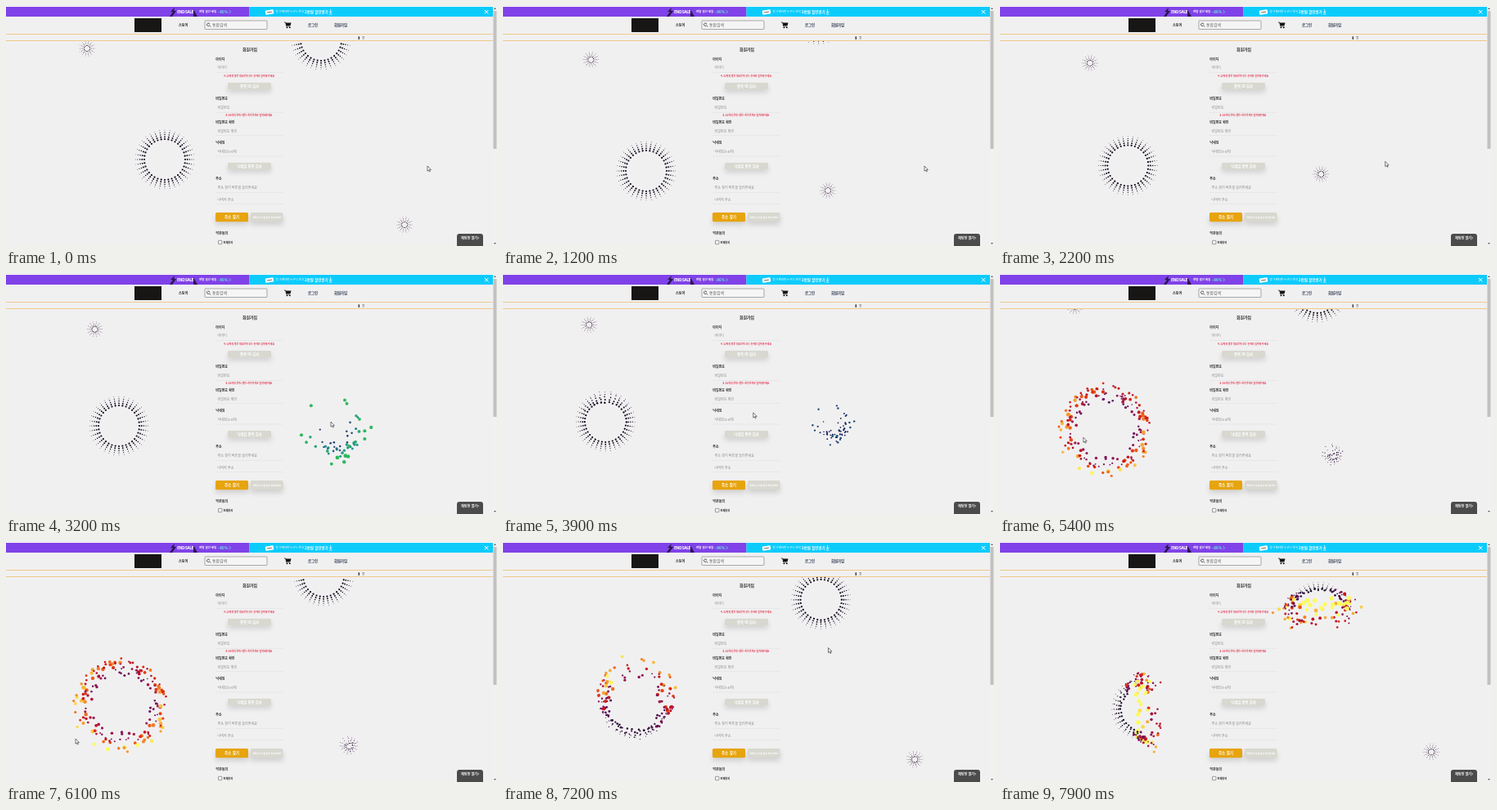
These frames come from a looping animation (600x294 px, 8000 ms). An HTML page with a canvas:

```html
<!DOCTYPE html>
<html lang="ko">
<head>
<meta charset="utf-8">
<style>
html, body { margin: 0; width: 600px; height: 294px; overflow: hidden; background: #f1f0f1; }
canvas, svg { position: absolute; left: 0; top: 0; width: 600px; height: 294px; }
text { font-family: "Noto Sans CJK KR", "Noto Sans CJK", "Noto Sans CJK JP", sans-serif; white-space: pre; }
.tight { letter-spacing: -.6px; }
</style>
</head>
<body>
<canvas width="600" height="294"></canvas>
<svg viewBox="0 0 600 294">
  <defs>
    <filter id="soft" x="-30%" y="-80%" width="160%" height="300%"><feGaussianBlur stdDeviation="3"/></filter>
  </defs>
  <g id="page"></g>
  <path id="cursor" d="M0 0V6.2L1.5 4.9L2.5 7L3.4 6.6L2.5 4.6H4.4Z" fill="#fff" stroke="#222" stroke-width=".6"/>
</svg>
<script>
const LOOP = 8, STEP = .1, HEADER = 43;

// ---- static page ----
const rect = (x, y, w, h, fill, more = '') =>
  `<rect x="${x}" y="${y}" width="${w}" height="${h}" fill="${fill}" ${more}/>`;
const line = (d, stroke, width = .8) => `<path d="${d}" fill="none" stroke="${stroke}" stroke-width="${width}"/>`;
const shape = (d, fill) => `<path d="${d}" fill="${fill}"/>`;
const text = (x, y, size, str, fill = '#222', weight = 700, more = '') =>
  `<text x="${x}" y="${y + size * .36}" font-size="${size}" fill="${fill}" font-weight="${weight}" ${more}>${str}</text>`;
const centred = (x, y, size, str, fill, weight) => text(x, y, size, str, fill, weight, 'text-anchor="middle"');
const label = (y, str) => text(256.3, y, 4, str);
const field = (y, str) => text(258.5, y, 4.1, str, '#868686', 400) + rect(256, y + 5, 83, .5, '#dcdcdc');
const hint = (y, str) => centred(297, y, 2.9, str, '#e0354f');
const button = (x, y, w, h, fill, str, size = 4.4) =>
  rect(x, y + 4, w, h, '#000', 'opacity=".13" filter="url(#soft)"') +
  rect(x, y, w, h, fill, 'rx="1.5"') + centred(x + w / 2, y + h / 2, size, str, '#fff');

const banner =
  rect(0, 0, 600, 1, '#fafafa') + rect(0, 1, 297.5, 12, '#7f42e8') + rect(297.5, 1, 298, 12, '#0ccbfb') +
  shape('M200 13L204 7H201L206 2L205 6H208L203 13ZM229 13V4L234 13Z', '#2a1650') +
  text(209, 7.2, 5.2, 'END SALE', '#fff', 900, 'class="tight"') +
  text(236, 7.2, 3.5, '연말 결산 세일', '#fff') +
  text(258.5, 7.2, 4.6, '~86%', '#5df0dc') + line('M272.5 5.2L274.5 7.2L272.5 9.2', '#5df0dc') +
  rect(317, 4.8, 10, 5.4, '#fff', 'rx="1" transform="rotate(-8 322 7.5)"') + line('M319 8L325 7.1', '#444') +
  text(329.5, 7.2, 3.4, '첫 구매라면 누구나 최대', '#fff', 400) +
  text(365, 7.2, 4.5, '2만원 할인받기', '#fff') +
  line('M396.7 4V8.3M395 6.8L396.7 8.5L398.4 6.8M395 10H398.4', '#fff') +
  line('M585 5L589.4 9.4M589.4 5L585 9.4', '#fff', 1);

const header =
  rect(157, 15, 33, 17, '#171615') + text(211, 23.2, 4.1, '스토어') +
  rect(243, 18, 76, 10.5, '#f5f5f5', 'stroke="#888" stroke-width=".7" rx=".8"') +
  line('M248.9 22.6A1.7 1.7 0 1 0 248.5 23.8L250.2 25.6', '#333') +
  text(252, 23.2, 4.9, '통합검색', '#666', 400) +
  line('M340 20H341.6L342.8 25H347.4', '#111') + shape('M341.8 20.6H348.5L347.5 24H342.6Z', '#111') +
  '<circle cx="343.4" cy="26.3" r=".9"/><circle cx="346.8" cy="26.3" r=".9"/>' +
  text(369, 23.2, 4.3, '로그인', '#23304a') + text(401, 23.2, 4.4, '회원가입', '#23304a') +
  rect(0, 34, 595, 1, '#f0c98a') + rect(0, 42, 595, 1, '#f0c98a') +
  rect(430.5, 37.3, 1.6, 3.6, '#444') + rect(436, 37.4, 1.7, 3.3, 'none', 'stroke="#777" stroke-width=".5"');

const form =
  centred(298, 53, 4.9, '회원가입') +
  label(65.5, '아이디') + field(76, '아이디') +
  hint(86, '4~12자의 영문 대소문자 또는 숫자로 입력해 주세요') +
  button(271, 94, 53, 8, '#d8d8d0', '중복 ID 검사') +
  label(114, '비밀번호') + field(125, '비밀번호') +
  hint(134.3, '8~16자의 문자+영문+특수문자로 입력해주세요') +
  label(143, '비밀번호 확인') + field(153.5, '비밀번호 확인') +
  label(167.5, '닉네임') + field(178.7, '닉네임(3-8자)') +
  button(271, 192, 53, 8, '#d8d8d0', '닉네임 중복 검사') +
  label(212, '주소') + field(223, '주소 찾기 버튼을 눌러주세요') + field(237.5, '나머지 주소') +
  button(256, 253, 40, 11.3, '#e7a40c', '주소 찾기', 4.6) +
  button(299, 253, 39.5, 11.3, '#d8d8d0', '정확한 주소를 눌러 확인하세요', 2.75) +
  label(279, '약관동의') +
  rect(259.5, 287.3, 4.4, 4.4, '#fff', 'stroke="#555" stroke-width=".6" rx=".6"') + text(265.5, 289.8, 3.2, '전체동의');

const frame =
  rect(595, 0, 5, 294, '#f1f1f1') + rect(595.5, 6, 4, 169, '#c1c1c1') +
  shape('M596 4L597.5 2L599 4ZM596 290L597.5 292L599 290Z', '#666') +
  rect(551, 279, 32, 18, '#4b4b4b', 'rx="3"') + centred(567, 284.8, 4.1, '채팅창 열기?', '#fff');

document.getElementById('page').innerHTML = banner + header + form + frame;

// ---- motion: keys are [seconds, x, y] ----
function segment(keys, t) {
  const next = keys.findIndex(k => k[0] > t);
  const i = next < 0 ? keys.length - 1 : next;
  const [a, b] = [keys[i - 1], keys[i]];
  return { a, b, before: keys[i - 2] || a, after: keys[i + 1] || b, u: Math.min(1, (t - a[0]) / (b[0] - a[0])) };
}

function straight(keys, t) {
  const { a, b, u } = segment(keys, t);
  return [1, 2].map(j => a[j] + (b[j] - a[j]) * u);
}

function curve(keys, t) {
  const { a, b, before, after, u } = segment(keys, t), span = b[0] - a[0];
  return [1, 2].map(j => {
    const m = (b[j] - before[j]) / (b[0] - before[0]) * span;
    const n = (after[j] - a[j]) / (after[0] - a[0]) * span;
    return a[j] + (b[j] - a[j]) * u * u * (3 - 2 * u) + u * (1 - u) * (m * (1 - u) - n * u);
  });
}

let seed = 7;
const random = () => (seed = seed * 16807 % 2147483647) / 2147483647;

// ---- dotted rings ----
function dots(spokes, rows, inner, gap, big, small) {
  return Array.from({ length: spokes * rows }, (_, i) => {
    const row = i % rows, a = (i - row) / rows / spokes * 2 * Math.PI, d = inner + row * gap;
    return { x: d * Math.cos(a), y: d * Math.sin(a), size: big + (small - big) * row / (rows - 1),
      push: .35 + .65 * random() ** 1.4, turn: (random() - .5) * .9 };
  });
}

const largeRing = () => dots(36, 5, 25, 2.7, 1.1, .4);
const smallRing = () => dots(14, 4, 3.6, 1.9, .55, .35);
const warm = u => `hsl(${265 + 155 * u} ${60 + 35 * u}% ${6 + 62 * u}%)`;
const cool = u => `hsl(${290 - 150 * u} 60% ${10 + 35 * u}%)`;

// A burst swells up to its peak, then dies away; x and y are its source relative to the ring centre.
const burst = (peak, decay, x, y, strength, reach) => ({ peak, decay, x, y, strength, reach });
const level = (b, t) => t < b.peak ? Math.exp(-(((t - b.peak) / .35) ** 2)) : Math.exp((b.peak - t) / b.decay);

const leftKeys = [[0, 194, 188], [1.2, 175, 202], [3.2, 138, 186], [4.5, 120, 180], [6.1, 142, 197], [7.9, 174, 205]];
const rightKeys = [[0, 487, 268], [1.2, 397, 226], [3.2, 402, 192], [4.5, 405, 188], [6.1, 419, 249], [7.2, 503, 266], [7.9, 527, 257]];

const rings = [
  { dots: smallRing(), color: cool, bursts: [],
    place: t => { const fall = (t / 2.35 - 1) ** 2; return [110 - 11 * fall, 70 - 18 * fall]; } },
  { dots: largeRing(), color: warm, place: t => curve(leftKeys, t),
    bursts: [burst(4.5, .4, 4, -30, 38, 48), burst(5.7, .6, -4, 10, 66, 72),
      burst(7.2, .3, 4, -24, 30, 50), burst(7.9, .4, 48, -5, 46, 66)] },
  { dots: smallRing(), color: cool, place: t => curve(rightKeys, t),
    bursts: [burst(3.2, 1, -3, -6, 38, 60)] },
  { dots: largeRing(), color: warm, place: t => [385 + .5 * t, 42 - 54 * Math.sin(Math.PI * t / 6.1)],
    bursts: [burst(7.9, .4, 4, 60, 50, 88)] }
];

const cursorKeys = [[0, 515, 196], [1.9, 515, 196], [2.7, 397, 181], [3.6, 397, 181], [4.5, 123.5, 147.5],
  [6.1, 85, 241], [7.1, 397.5, 129.5], [7.3, 397.5, 129.5], [7.8, 385, -12]];

const ctx = document.querySelector('canvas').getContext('2d');
const cursor = document.getElementById('cursor');

function drawRing({ dots, color, place, bursts }, t) {
  const [cx, cy] = place(t);
  for (const d of dots) {
    let x = 0, y = 0;
    for (const b of bursts) {
      const dx = d.x - b.x, dy = d.y - b.y;
      const near = Math.max(0, 1 - (Math.hypot(dx, dy) / b.reach) ** 2);
      const shift = b.strength * level(b, t) * near * d.push;
      const angle = Math.atan2(dy, dx) + d.turn;
      x += shift * Math.cos(angle);
      y += shift * Math.sin(angle);
    }
    const moved = Math.hypot(x, y);
    ctx.fillStyle = color(Math.min(1, moved / 30));
    ctx.beginPath();
    ctx.arc(cx + d.x + x, cy + d.y + y, d.size + Math.min(moved, 40) * .05, 0, 7);
    ctx.fill();
  }
}

function draw(seconds) {
  const t = Math.floor(seconds % LOOP / STEP + 1e-6) * STEP;
  ctx.clearRect(0, 0, 600, 294);
  ctx.save();
  ctx.beginPath();
  ctx.rect(0, HEADER, 595, 294);
  ctx.clip();
  rings.forEach(ring => drawRing(ring, t));
  ctx.restore();
  cursor.setAttribute('transform', `translate(${straight(cursorKeys, t)})`);
}

const start = performance.now();
function tick() {
  draw((performance.now() - start) / 1000);
  requestAnimationFrame(tick);
}
tick();
</script>
</body>
</html>
```
